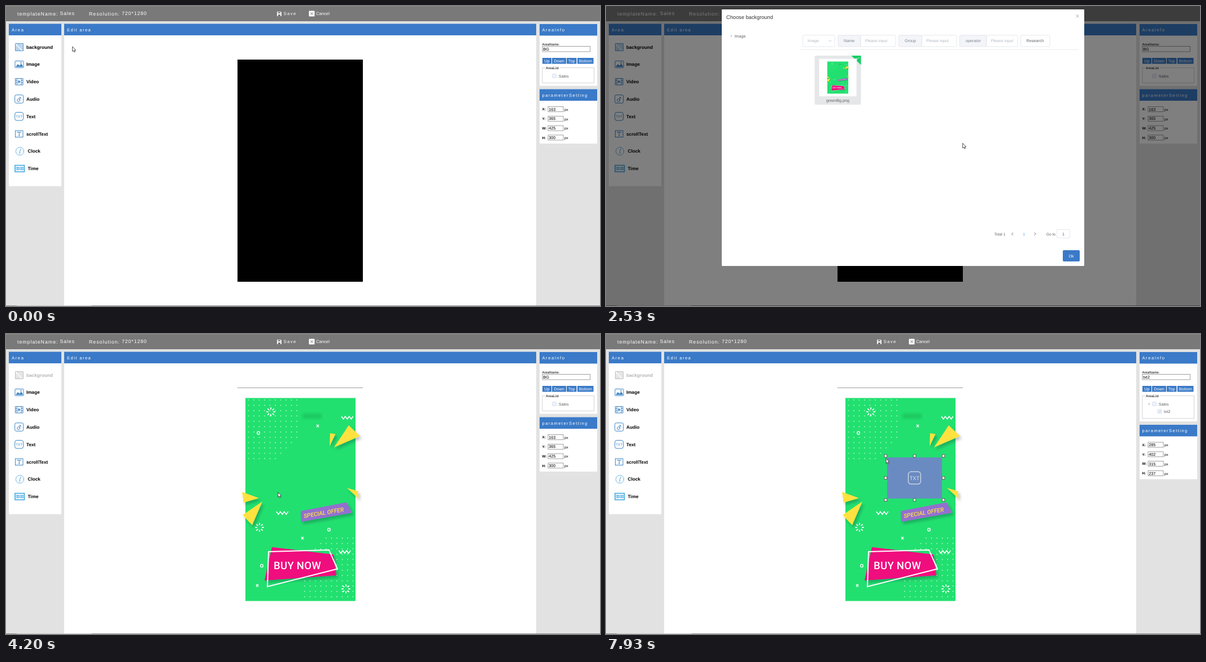
Write an HTML page that moves like this. It is 1052x532 px and loops after 8000 ms.

```html
<!DOCTYPE html>
<html lang="en">
<head>
<meta charset="utf-8">
<title>Template editor</title>
<style>
html, body { margin: 0; width: 100%; height: 100%; overflow: hidden; background: #e2e2e2; }
svg { display: block; width: 1052px; height: 532px; }
text { font-family: "Liberation Sans", Arial, sans-serif; text-rendering: geometricPrecision; white-space: pre; }
.promo { font-family: Roboto, sans-serif; font-weight: 500; }
.item { color: #3d85c6; fill: none; stroke: currentColor; stroke-width: 1; }
.item text { fill: #000; stroke: none; }
.item .glyph { fill: currentColor; }
.item.off { color: #b4b4b4; }
.item.off text { fill: #b4b4b4; }
</style>
</head>
<body>
<svg id="stage" viewBox="0 0 1052 532" xmlns="http://www.w3.org/2000/svg"></svg>
<script>
const BLUE = '#3a7ac8', GREEN = '#22e070', YELLOW = '#ffe23f';
const LOOP = 8000;

// Markup helpers; text y is the vertical middle of the capitals.
const text = (x, y, s, size, fill = '#000', more = '') =>
  `<text x="${x}" y="${y + size * .36}" font-size="${size}" fill="${fill}" ${more}>${s}</text>`;
const rect = (x, y, w, h, fill, more = '') =>
  `<rect x="${x}" y="${y}" width="${w}" height="${h}" fill="${fill}" ${more}/>`;
const line = (d, color, width = 1, more = '') =>
  `<path d="${d}" fill="none" stroke="${color}" stroke-width="${width}" ${more}/>`;
const poly = (points, fill, more = '') => `<polygon points="${points}" fill="${fill}" ${more}/>`;
const group = (id, body, more = '') => `<g id="${id}" ${more}>${body}</g>`;
const spaced = n => `letter-spacing="${n}"`;
const MIDDLE = 'text-anchor="middle"', BOLD = 'font-weight="bold"';
const field = (x, y, w, h, id, value) =>
  rect(x, y, w, h, '#fff', 'stroke="#777" stroke-width=".7"') +
  text(x + 1.2, y + h / 2, value, 7.3, '#000', `id="${id}"`);
const times = (n, f) => Array.from({ length: n }, (_, i) => f(i)).join('');

function dots() {
  let out = '';
  for (let row = 0; row < 12; row++)
    for (let col = 0; col < Math.min(10, 17 - row); col++) {
      const x = 429.5 + col * 9.5, y = 117 + row * 9.45;
      out += `<circle cx="${x}" cy="${y}" r="1"/><circle cx="${1044 - x}" cy="${583 - y}" r="1"/>`;
    }
  return `<g fill="#fff" opacity=".6">${out}</g>`;
}

const burst = (x, y) => times(8, i =>
  line('M0-4V-8', '#fff', 1.7, `transform="translate(${x} ${y}) rotate(${i * 45})"`));
const ring = (x, y) =>
  `<ellipse cx="${x}" cy="${y}" rx="2.2" ry="2.6" fill="none" stroke="#fff" stroke-width="1.4"/>`;
const cross = (x, y) => line(`M${x - 2} ${y - 2.2}l4 4.4m0-4.4l-4 4.4`, '#fff', 1.4);
const zigzag = (x, y) => line(`M${x} ${y - 2}l3.5 4.8 3.4-4.8 3.5 4.8 3.4-4.8 3.5 4.8 3.4-4.8`, '#fff', 1.6);

function poster() {
  const shadow = 'filter="url(#drop)"';
  return rect(424, 113.5, 195, 360, GREEN) + dots() +
    rect(525, 141, 34, 9, '#12a84e', 'opacity=".4" filter="url(#soft)"') +
    burst(469, 138) + burst(449, 343) + burst(602, 452) +
    ring(447, 175.5) + ring(453, 411) + ring(572, 347) +
    cross(552, 163) + cross(525, 362) + cross(445, 446) +
    zigzag(594, 148) + zigzag(479, 317) + zigzag(589.5, 386) +
    `<g ${shadow}>` + [
      '607,162 627,181 581,201', '574,176 583.5,177.5 573,199', '604,273 623,278.5 624.5,292',
      '418,280 448,291 421,299', '454,297 419,321 436,339'
    ].map(p => poly(p, YELLOW)).join('') + '</g>' +
    poly('522,314 603,298.5 613,317 523,333', '#9370cf', shadow) +
    text(0, 0, 'SPECIAL OFFER', 10.3, YELLOW,
      `class="promo" font-style="italic" ${MIDDLE} transform="translate(562.5 317) rotate(-9.5)"`) +
    poly('471,378 580,391 585,428 458,437', '#f00a7e', shadow) +
    line('M465 386L572 383 587 416.5 463 448Z', '#fff', 2) +
    text(516, 410, 'BUY NOW', 18.5, '#fff', `class="promo" ${MIDDLE} ${spaced(.3)}`);
}

function sidebar() {
  const box = 'M16.5 66.5h14v13h-14Z';
  const icons = [
    ['background', line(box + times(5, i => `M16.5 ${69 + i * 2.4}L${27 - i * 2.2} 79.5M${18 + i * 2.4} 66.5l${12.5 - i * 2.4} ${12.5 - i * 2.4}`)
      , 'currentColor', .8)],
    ['Image', `<rect x="16" y="97.5" width="15" height="12" rx="1"/><path class="glyph" stroke="none" d="M17 108l4-5 3 3 3-4 3.5 6Z"/><circle cx="26.5" cy="100.5" r="1"/>`],
    ['Video', `<path d="M16.5 128.5h13.5v11.5h-13.5ZM19.5 128.5v11.5M27 128.5v11.5M16.5 132h3m-3 4h3m7.5-4h3m-3 4h3"/><path class="glyph" d="M22 132l3.2 2.3-3.2 2.3Z"/>`],
    ['Audio', `<rect x="15.7" y="157.7" width="15" height="14.5" rx="2.5"/><circle cx="22.2" cy="167" r="2.4"/><path d="M24.6 167v-6q.5 2 2.5 2.3"/>`],
    ['Text', `<rect x="15.7" y="188.5" width="15" height="14.5" rx="3.5"/><text class="glyph" x="23.2" y="198" font-size="6.2" text-anchor="middle" style="fill:currentColor">TXT</text>`],
    ['scrollText', `<rect x="16.5" y="221" width="13.5" height="11.5"/><path d="M20 225v-1.2h6.6v1.2M23.3 224v6m-1.3 0h2.6"/>`],
    ['Clock', `<circle cx="24.5" cy="257.5" r="7" stroke="#3d9fd6" stroke-dasharray="2.8 .9"/><path d="M26.5 253l-2 4.5v4.5" stroke="#3d9fd6"/>`],
    ['Time', `<rect x="16" y="282.5" width="16.5" height="11.5" stroke="#2e9bda" stroke-width="1.4"/><path stroke="#2e9bda" stroke-width=".8" d="M18.2 285.7h2v5h-2ZM21.4 285.7h2v5h-2ZM25.4 285.7h2v5h-2ZM28.6 285.7h2v5h-2Z"/>`]
  ];
  return rect(5, 31.5, 93, 288, '#fff') + rect(5, 31.5, 93, 20.5, BLUE) +
    text(10, 42, 'Area', 7.67, '#fff', spaced(1.6)) +
    icons.map(([name, icon], i) => group('item' + i,
      icon + text(i < 6 ? 36 : 38.5, 72.7 + i * 30.8, name, 8.22, '', BOLD), 'class="item"')).join('');
}

function topBar() {
  return rect(0, 0, 1052, 27, '#797979') + rect(0, 0, 1052, 1, '#8b8585') +
    text(20, 13.8, 'templateName:', 8.77, '#fff', spaced(1)) +
    text(95.5, 13.3, 'Sales', 8.77, '#fff', spaced(.9)) +
    text(147, 13.8, 'Resolution:', 8.77, '#fff', spaced(1)) +
    text(205, 13.3, '720*1280', 8.77, '#fff', spaced(.9)) +
    '<path fill="#fff" fill-rule="evenodd" d="M480 10h6.5l1.3 1.3V18H480ZM481.5 10.8v2.2h4.5v-2.2ZM481.8 15v3h4.2v-3Z"/>' +
    text(491.5, 13.5, 'Save', 7.67, '#fff', spaced(1.4)) +
    rect(536.5, 8.5, 10, 10, '#fff', 'rx="1"') + line('M539.5 11.5l4 4m0-4l-4 4', '#555') +
    text(549, 13.5, 'Cancel', 7.67, '#fff');
}

function infoPanel() {
  const button = (x, w, s) => rect(x, 92, w, 10.5, BLUE) + text(x + w / 2, 97.4, s, 7.3, '#fff', MIDDLE);
  const check = (x, y) => rect(x, y, 7, 7, '#edf2fc', 'stroke="#d3d9e4" stroke-width=".7" rx="1"');
  const params = [['X', 163], ['Y', 365], ['W', 425], ['H', 300]];
  return rect(945, 32, 102, 109.5, '#fff', 'id="infoBody"') + rect(945, 32, 102, 20.5, BLUE) +
    text(949.5, 42.3, 'AreaInfo', 7.67, '#fff', spaced(1.5)) +
    text(949.5, 68, 'AreaName:', 6.1) + field(950, 71.5, 84.5, 9.5, 'areaName', 'BG') +
    button(950, 16, 'Up') + button(967, 25, 'Down') + button(993, 17.5, 'Top') + button(1012, 28.5, 'Bottom') +
    rect(950, 109.3, 91.5, 27, 'none', 'id="listFrame" stroke="#c8c8c8" stroke-width=".8"') +
    rect(954.5, 107, 27, 5, '#fff') + text(956, 109.4, 'AreaList', 6.3) +
    check(967.5, 120.5) + text(978.7, 124.2, 'Sales', 7.2, '#606266') +
    group('child', line('M960.5 124h2.6', '#888', 1.1) + check(977, 133.7) +
      line('M978.7 137.2l1.4 1.5 2.5-3', '#b8bec9', .9) + text(988, 137.4, 'txt2', 7.2, '#606266')) +
    group('params', rect(945, 147.5, 102, 96.5, '#fff') + rect(945, 147.5, 102, 20.5, BLUE) +
      text(949.5, 157.8, 'parameterSetting', 7.67, '#fff', spaced(1.4)) +
      params.map(([k, v], i) => {
        const y = 183 + i * 16.8;
        return text(949.5, y, k + ':', 6.3, '#000', BOLD) + field(960, y - 4.5, 27, 9, 'param' + k, v) +
          text(989, y + .5, 'px', 6.4);
      }).join(''));
}

function dialog() {
  const box = (x, w, fill, s, color, tx) =>
    rect(x, 51.8, w, 20.2, fill, 'stroke="#dcdfe6" stroke-width=".7" rx="1.5"') + text(tx, 61.8, s, 7.2, color);
  const GRAY = '#606266', PALE = '#b4b8c0', TAG = '#f3f5f9';
  return rect(205, 6, 642, 455, '#fff', 'rx="1"') +
    text(213, 19.5, 'Choose background', 9.26, '#303133') +
    line('M832.5 15.3l5 5m0-5l-5 5', '#909399', .8) +
    poly('221,51 223.5,53 221,55', '#b8bcc4') + text(227.5, 53.2, 'Image', 7.2, GRAY) +
    box(348.5, 56.5, '#fff', 'Image', PALE, 357) + line('M394 60.5l2.5 2.5 2.5-2.5', '#b4b8c0', .8) +
    box(411, 40, TAG, 'Name', '#7d838d', 421) + box(451, 62, '#fff', 'Please input', PALE, 458.7) +
    box(518.5, 41, TAG, 'Group', '#7d838d', 529) + box(559.5, 61.5, '#fff', 'Please input', PALE, 567.3) +
    box(626.5, 47.5, TAG, 'operator', '#7d838d', 637) + box(674, 55, '#fff', '', PALE, 0) +
    `<g clip-path="url(#inputClip)">${text(681.7, 61.8, 'Please input', 7.2, PALE)}</g>` +
    box(734.5, 51.5, '#fff', 'Research', GRAY, 744.5) +
    line('M343.5 77.5H836', '#e6e8ec', .8) +
    group('chosen', rect(369.5, 88, 82, 87, '#e6e7e9', 'rx="2"') +
      poly('434.5,88 451.5,88 451.5,104.5', '#13ce66') + line('M443.5 92.5l1.8 1.8 3.2-3.3', '#fff', .8)) +
    rect(377, 93.3, 67, 67, '#fff', 'stroke="#e4e6ea" stroke-width=".7"') +
    '<use href="#poster" transform="translate(392 98.5) scale(.19 .158) translate(-424 -113.5)"/>' +
    text(410.5, 167, 'greenBg.png', 7.2, GRAY, MIDDLE) +
    text(687.7, 404.2, 'Total 1', 6.7, GRAY) + line('M721 401.7l-2.5 2.5 2.5 2.5M758.5 401.7l2.5 2.5-2.5 2.5', '#606266', .9) +
    text(740, 404.2, '1', 6.7, '#409eff', MIDDLE) + text(779.7, 404.2, 'Go to', 6.7, GRAY) +
    rect(798.3, 396.5, 23.2, 14.8, '#fff', 'stroke="#dcdfe6" stroke-width=".7" rx="1.5"') +
    text(810, 404.2, '1', 7.2, GRAY, MIDDLE) +
    rect(809, 433, 30, 20, BLUE, 'id="ok" rx="2"') + text(824, 443, 'Ok', 7.2, '#fff', MIDDLE);
}

// Drawn with its top left corner at 0,0.
function area() {
  const handles = [-2.6, 48.6, 99.7].flatMap(x => [-2.6, 36.4, 75.5].map(y => [x, y]))
    .filter((_, i) => i !== 4)
    .map(([x, y]) => rect(x - 2.3, y - 2.3, 4.6, 4.6, '#fff', 'stroke="#555" stroke-width=".9"')).join('');
  return rect(0, 0, 97.2, 73, '#6a8bc2') +
    rect(37.5, 25.4, 22, 22, 'none', 'rx="5" stroke="#dde1e6" stroke-width="1.2"') +
    text(48.6, 36.6, 'TXT', 9.4, '#dde1e6', MIDDLE) +
    group('trash', line('M87 4.3h7M89 4v-1.3h3V4M87.9 4.5v5.8h5.2v-5.8M89.7 6v2.8M91.4 6v2.8', '#fff', .9)) + handles;
}

const cursors =
  group('arrow', '<path d="M0 0V8.6L2 6.9 3.4 9.8 4.8 9.2 3.5 6.4H6Z" fill="#fff" stroke="#222" stroke-width=".8"/>') +
  group('hand', '<path d="M1.2 1q1-1.2 1.8 0v3.6l3.6.8q1 .3.8 1.5l-.7 3.8H2.8L-.8 6.8q.2-1.2 2 .2Z" fill="#fff" stroke="#222" stroke-width=".8"/>') +
  group('move', '<path d="M0-5l2 2.3H.8V-.8H2.7V-2L5 0 2.7 2V.8H.8V2.7H2L0 5-2 2.7H-.8V.8H-2.7V2L-5 0-2.7-2V-.8H-.8V-2.7H-2Z" fill="#222" stroke="#fff" stroke-width=".5"/>');

const stage = document.getElementById('stage');
stage.innerHTML = `<defs>
  <filter id="drop" x="-30%" y="-30%" width="160%" height="160%"><feDropShadow dx="3" dy="4" stdDeviation="2.5" flood-color="#123" flood-opacity=".28"/></filter>
  <filter id="soft" x="-30%" y="-90%" width="160%" height="280%"><feGaussianBlur stdDeviation="2"/></filter>
  <clipPath id="inputClip"><rect x="675" y="52" width="46" height="20"/></clipPath>
  <g id="poster">${poster()}</g></defs>` +
  rect(0, 0, 1052, 532, '#e2e2e2') + topBar() + sidebar() +
  rect(103, 31.5, 836, 500, '#fff') + rect(103, 31.5, 836, 20.5, BLUE) +
  text(108, 42, 'Edit area', 7.67, '#fff', spaced(1.4)) +
  rect(410, 95, 222, 394, '#000', 'id="blank"') +
  group('filled', line('M410 95.4H632', '#909090', .9) + '<use href="#poster"/>') +
  group('area', area()) + infoPanel() +
  rect(0, 531, 1052, 1, '#8c8c8c') + rect(19, 531, 132, 1, '#c4c4c4') +
  rect(0, 0, 1052, 532, '#000', 'id="shade"') + group('dialog', dialog()) + group('cursor', cursors);

const el = {};
stage.querySelectorAll('[id]').forEach(node => el[node.id] = node);

const areaPath = [
  [5200, 380, 118], [5290, 380, 118], [5600, 410.6, 95], [5680, 410.6, 95], [6100, 452, 198],
  [6600, 469.2, 211.4], [6750, 485, 218.8], [6930, 494, 199], [7100, 497.9, 218.8]
];
const cursorPath = [
  [70, 117.7, 72], [330, 85, 30], [560, 30, 66], [870, 45, 72], [1200, 161, 82.5], [1530, 161, 82.5],
  [1730, 330, 100], [2000, 405, 140], [2130, 410, 150], [2530, 631, 243], [2600, 679, 270],
  [3200, 812.5, 434], [3900, 812.5, 434], [4330, 340, 215], [4600, 36, 196], [4750, 45, 196],
  [5130, 439, 170], [5200, 439, 170], [7400, 557, 271], [7930, 496, 220.7]
];

function along(path, t) {
  const i = path.findIndex(p => p[0] > t);
  if (i === 0) return path[0].slice(1);
  if (i < 0) return path[path.length - 1].slice(1);
  const [a, b] = [path[i - 1], path[i]], k = (t - a[0]) / (b[0] - a[0]);
  return [a[1] + (b[1] - a[1]) * k, a[2] + (b[2] - a[2]) * k];
}
const ramp = (t, start, length) => Math.min(1, Math.max(0, (t - start) / length));
const show = (node, on) => node.style.display = on ? '' : 'none';
const place = (node, x, y) => node.setAttribute('transform', `translate(${x} ${y})`);

function render(t) {
  const filled = t >= 3471, dropped = t >= 5170, dragging = t >= 5200 && t < 7400, selected = t >= 7660;
  show(el.blank, !filled);
  show(el.filled, filled);
  el.item0.classList.toggle('off', filled);

  const shown = ramp(t, 1280, 295) - ramp(t, 3460, 300);
  show(el.dialog, shown > 0);
  el.dialog.style.opacity = shown;
  place(el.dialog, 0, -10.5 * (1 - shown));
  el.shade.style.opacity = .5 * (ramp(t, 1280, 200) - ramp(t, 3460, 200));
  show(el.chosen, t >= 2070);
  el.ok.setAttribute('fill', t >= 3130 ? '#e2625a' : BLUE);

  const [ax, ay] = along(areaPath, t);
  show(el.area, dropped);
  place(el.area, ax, ay);
  el.area.style.opacity = selected ? 1 : .6;
  show(el.trash, !selected);

  show(el.child, dropped);
  el.infoBody.setAttribute('height', dropped ? 123 : 109.5);
  el.listFrame.setAttribute('height', dropped ? 40.5 : 27);
  place(el.params, 0, dropped ? 13.5 : 0);
  el.areaName.textContent = t >= 7460 ? 'txt2' : 'BG';
  const values = dropped
    ? [Math.round((ax - 410) * 720 / 222), Math.round((ay - 95) * 1280 / 394), 315, 237]
    : [163, 365, 425, 300];
  ['X', 'Y', 'W', 'H'].forEach((k, i) => el['param' + k].textContent = values[i]);

  const hand = t >= 3130 && t < 3930;
  const [cx, cy] = dragging ? [ax + 59, ay + 52] : along(cursorPath, t);
  place(el.cursor, cx, cy);
  show(el.move, dragging);
  show(el.hand, hand);
  show(el.arrow, !hand && !dragging);
}

const start = performance.now();
function tick() {
  render((performance.now() - start) % LOOP);
  requestAnimationFrame(tick);
}
tick();
</script>
</body>
</html>
```
